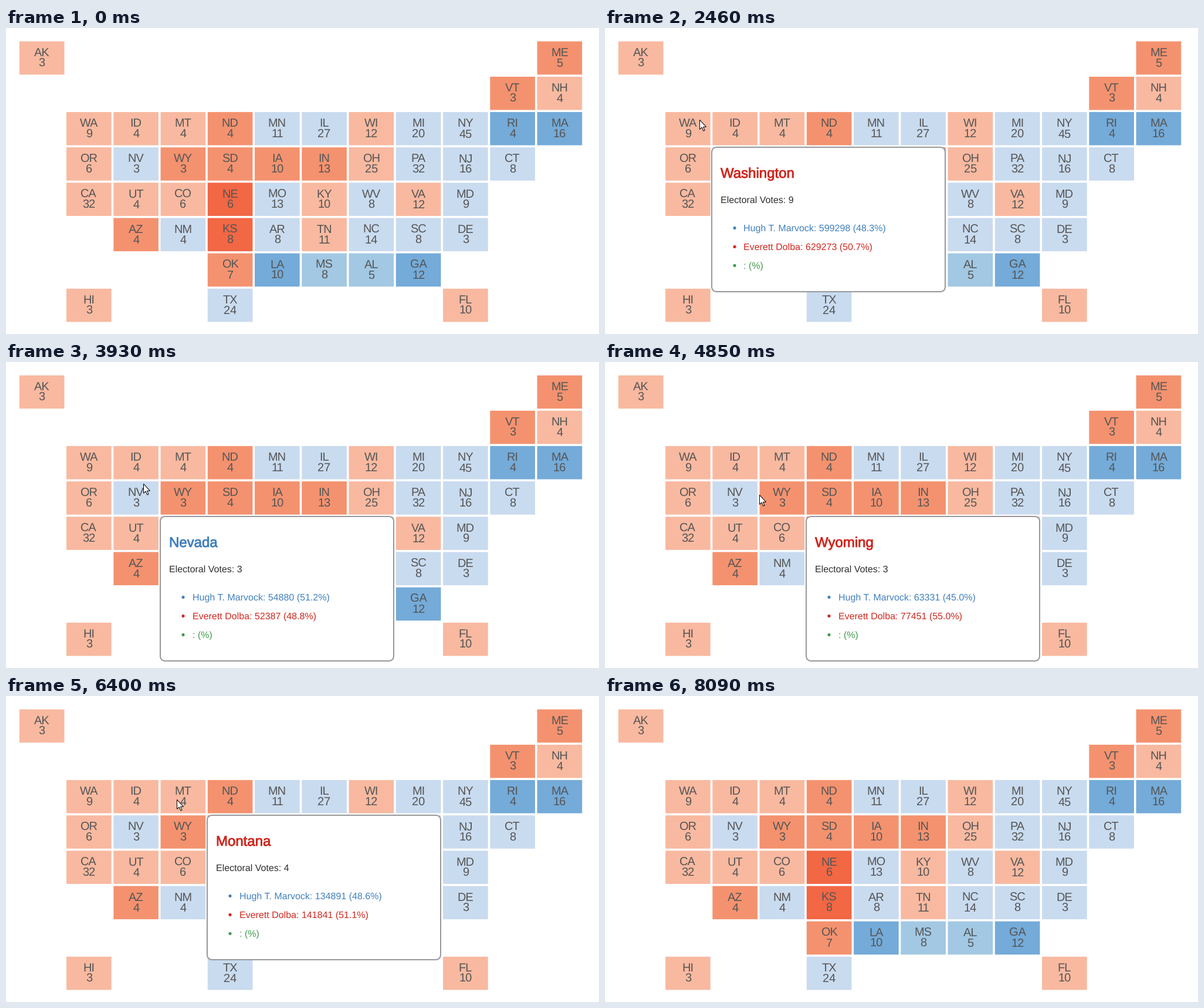
Animation, 1011 px wide and 521 px high, one loop 9.65 s. Source, as a matplotlib script:

```python
import matplotlib.pyplot as plt
import numpy as np
from matplotlib.animation import FuncAnimation
from matplotlib.patches import Circle, FancyBboxPatch, Polygon, Rectangle
from matplotlib.patheffects import withStroke

W, H = 1011, 521
LOOP_MS, INTERVAL = 9650, 50
# The pointer moves in steps of one tick.
TICK_MS, FIRST_TICK_MS = 77.1, 990

# One pixel equals one point at this dpi.
DPI = 72
MARGIN, GAP = 23, 4
PITCH = np.array((80.25, 60.15))

plt.rcParams["font.family"] = "Liberation Sans"
plt.rcParams["text.hinting"] = "none"

RED, BLUE, GREEN = "#d0281f", "#4080bd", "#3f9c4c"
SHADES = {
    "r": "#f8b9a0", "R": "#f4926f", "X": "#f26744",
    "b": "#c9dbef", "B": "#a2c8e3", "Z": "#74abd9",
}

# State, electoral votes and shade of each tile, with dots for empty places.
GRID = """
AK3r .     .    .    .     .     .     .     .     .     .    ME5R
.    .     .    .    .     .     .     .     .     .     VT3R NH4r
.    WA9r  ID4r MT4r ND4R  MN11b IL27b WI12r MI20b NY45b RI4Z MA16Z
.    OR6r  NV3b WY3R SD4R  IA10R IN13R OH25r PA32b NJ16b CT8b
.    CA32r UT4r CO6r NE6X  MO13b KY10r WV8b  VA12r MD9b
.    .     AZ4R NM4b KS8X  AR8b  TN11r NC14b SC8b  DE3b
.    .     .    .    OK7R  LA10Z MS8B  AL5B  GA12Z
.    HI3r  .    .    TX24b .     .     .     .     FL10r
"""

# Name, blue votes, red votes, all other votes
RESULTS = {
    "WA": ("Washington", 599298, 629273, 13001),
    "ID": ("Idaho", 138853, 161597, 0),
    "NV": ("Nevada", 54880, 52387, 0),
    "WY": ("Wyoming", 63331, 77451, 0),
    "MT": ("Montana", 134891, 141841, 847),
    "ND": ("North Dakota", 123963, 154310, 158),
}
BLUE_NAME, RED_NAME = "Hugh T. Marvock", "Everett Dolba"

# Pointer moves: start ms, end ms, goal, easing power (below 1 slows down)
START = (190, -25)
MOVES = [
    (913, 1610, (158, 156), 0.6),
    (2383, 2850, (209, 160), 1.6),
    (2923, 3330, (218, 161), 1),
    (3473, 4320, (240, 222), 0.45),
    (4393, 5160, (285, 230), 1.28),
    (5403, 6400, (291, 175), 1),
    (6403, 7090, (373, 172), 0.58),
    (7473, 8090, (390, -25), 1.4),
]
ARROW = np.array([(0, 0), (0, 16), (3.6, 12.6), (6.3, 18.7), (8.6, 17.7),
                  (6, 11.9), (11, 11.9)]) + 0.5

fig = plt.figure(figsize=(W / DPI, H / DPI), dpi=DPI, facecolor="white")
ax = fig.add_axes([0, 0, 1, 1])
ax.set(xlim=(0, W), ylim=(H, 0))
ax.axis("off")


def add_text(x, y, text, size, color, **style):
    return ax.text(x, y, text, size=size, color=color, va="baseline", **style)


def draw_tile(cell, state, votes, shade):
    x, y = MARGIN + PITCH * cell
    width, height = PITCH - GAP
    ax.add_patch(Rectangle((x - 0.2, y - 0.2), width + 0.4, height + 0.4,
                           fc=SHADES[shade], lw=0, snap=False))
    for label, baseline in ((state, 25), (votes, 43)):
        add_text(x + width / 2, y + baseline, label, 20, "#555555",
                 ha="center")


class Tooltip:
    """Rounded panel with the result of one state."""

    WIDTH, HEIGHT = 400, 248

    def __init__(self):
        self.box = ax.add_patch(FancyBboxPatch(
            (0, 0), self.WIDTH - 2, self.HEIGHT - 2, fc="white", ec="#98989b",
            lw=2, boxstyle="round,pad=0,rounding_size=9", zorder=5))
        self.title = add_text(0, 0, "", 24, RED, zorder=6)
        self.votes = add_text(0, 0, "", 16, "#2e2e2e", zorder=6)
        self.items = [
            (add_text(0, 0, "", 16, color, zorder=6),
             ax.add_patch(Circle((0, 0), 2.6, fc=color, lw=0, zorder=6)))
            for color in (BLUE, RED, GREEN)]
        self.artists = [self.box, self.title, self.votes,
                        *(part for item in self.items for part in item)]

    def update(self, cell):
        state, votes = tiles.get(cell, ("", ""))
        shown = state in RESULTS
        for artist in self.artists:
            artist.set_visible(shown)
        if shown:
            self.fill(cell, votes, *RESULTS[state])

    def fill(self, cell, votes, name, blue, red, other):
        x, y = np.round(MARGIN + PITCH * cell + (78.1, 58.7))
        total = blue + red + other
        color = BLUE if blue > red else RED
        self.box.set(x=x + 1, y=y + 1)
        # A thin outline thickens the regular weight.
        self.title.set(
            text=name, color=color, position=(x + 16, y + 53),
            path_effects=[withStroke(linewidth=0.8, foreground=color)])
        self.votes.set(text=f"Electoral Votes: {votes}",
                       position=(x + 16, y + 95.5))
        lines = (f"{BLUE_NAME}: {blue} ({blue / total:.1%})",
                 f"{RED_NAME}: {red} ({red / total:.1%})",
                 ": (%)")
        for i, (text, (label, bullet)) in enumerate(zip(lines, self.items)):
            label.set(text=text, position=(x + 55.5, y + 143.5 + 32 * i))
            bullet.center = (x + 40, y + 138.5 + 32 * i)


tiles = {}
for row, line in enumerate(GRID.strip().splitlines()):
    for col, entry in enumerate(line.split()):
        if entry != ".":
            state, votes, shade = entry[:2], entry[2:-1], entry[-1]
            tiles[col, row] = state, votes
            draw_tile((col, row), state, votes, shade)

tooltip = Tooltip()
pointer = ax.add_patch(Polygon(ARROW, closed=True, fc="white", ec="black",
                               lw=1, joinstyle="miter", zorder=10))


def pointer_position(ms):
    position = np.array(START, float)
    for begin, end, goal, power in MOVES:
        progress = np.clip((ms - begin) / (end - begin), 0, 1)
        position += (goal - position) * progress ** power
    return np.round(position)


def update(frame):
    tick = (frame * INTERVAL + 40 - FIRST_TICK_MS) // TICK_MS
    position = pointer_position(FIRST_TICK_MS + tick * TICK_MS)
    pointer.set_xy(ARROW + position)
    col, row = (position - MARGIN + GAP / 2) // PITCH
    tooltip.update((int(col), int(row)))
    return [pointer, *tooltip.artists]


animation = FuncAnimation(fig, update, frames=LOOP_MS // INTERVAL,
                          interval=INTERVAL, repeat=True, repeat_delay=0)
plt.show()
```
